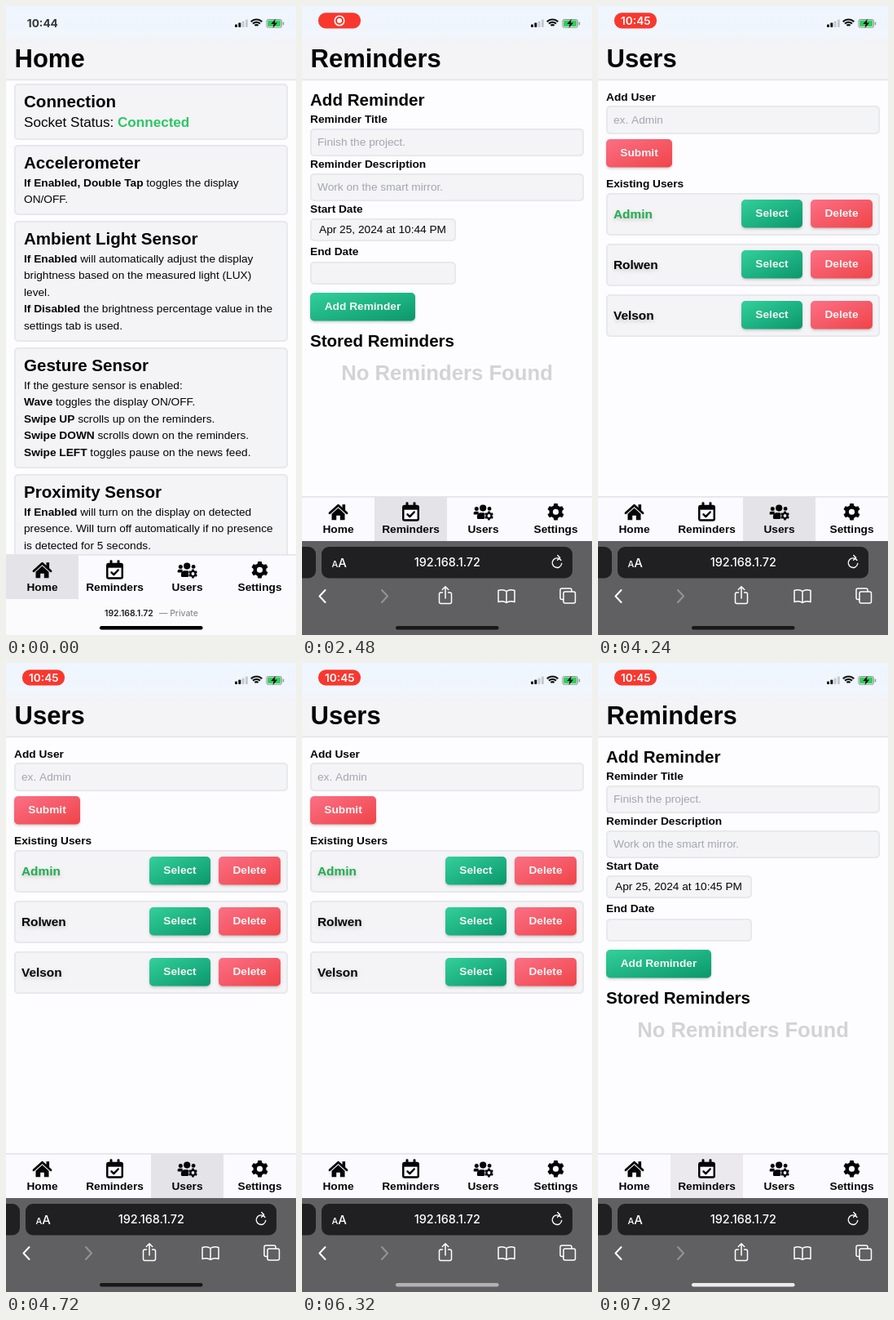
These frames come from a looping animation (356 by 770 pixels, 8 s). An HTML page with a canvas:

```html
<!DOCTYPE html>
<html lang="en">
<head>
<meta charset="utf-8">
<title>Smart mirror remote</title>
<style>
html, body { margin: 0; width: 100%; height: 100%; overflow: hidden; background: #fdfcfe; }
canvas { display: block; width: 356px; height: 770px; }
</style>
</head>
<body>
<canvas id="stage"></canvas>
<script>
const W = 356, H = 770, LOOP = 8000;
const ARIAL = '"Liberation Sans", Arial, sans-serif';
const UI = 'Inter, Roboto, sans-serif';
const SM = 13.7, MD = 15.4, LG = 17.1, XL = 20.55;
const GREEN = ['#33d09a', '#0a976b'], RED = ['#fb7086', '#f04448'];
const INK = '#050506', CARD = '#f4f3f6', LINE = '#e5e7ec';

const canvas = document.getElementById('stage');
const ctx = canvas.getContext('2d');
const dpr = window.devicePixelRatio || 1;
canvas.width = W * dpr;
canvas.height = H * dpr;

const clamp = v => Math.max(0, Math.min(1, v));
const ramp = (t, start, length) => clamp((t - start) / length);

// y is the middle of the capital letters
function text(str, x, y, size = SM, { weight = 700, color = INK, align = 'left', font = ARIAL } = {}) {
  ctx.font = `${weight} ${size}px ${font}`;
  ctx.fillStyle = color;
  ctx.textAlign = align;
  ctx.fillText(str, x, y + size * 0.358 - 0.7);
  return ctx.measureText(str).width;
}

function rich(x, y, bold, rest = '') {
  const w = bold ? text(bold, x, y) : 0;
  text(rest, x + w, y, SM, { weight: 400 });
}

function rect(x, y, w, h, fill) {
  ctx.fillStyle = fill;
  ctx.fillRect(x, y, w, h);
}

function round(x, y, w, h, r, fill) {
  ctx.beginPath();
  ctx.roundRect(x, y, w, h, r);
  ctx.fillStyle = fill;
  ctx.fill();
}

function disc(x, y, r, fill) {
  ctx.beginPath();
  ctx.arc(x, y, r, 0, Math.PI * 2);
  ctx.fillStyle = fill;
  ctx.fill();
}

function poly(points, fill) {
  ctx.beginPath();
  points.forEach(([x, y]) => ctx.lineTo(x, y));
  ctx.fillStyle = fill;
  ctx.fill();
}

function stroke(d, color, width) {
  ctx.strokeStyle = color;
  ctx.lineWidth = width;
  ctx.lineCap = ctx.lineJoin = 'round';
  ctx.stroke(new Path2D(d));
}

function at(x, y, draw) {
  ctx.save();
  ctx.translate(x, y);
  draw();
  ctx.restore();
}

function fade(alpha, draw) {
  if (alpha <= 0) return;
  ctx.save();
  ctx.globalAlpha *= alpha;
  draw();
  ctx.restore();
}

function shadowed(color, blur, dy, draw) {
  ctx.save();
  ctx.shadowColor = color;
  ctx.shadowBlur = blur * dpr;
  ctx.shadowOffsetY = dy * dpr;
  draw();
  ctx.restore();
}

function box(x, y, w, h) {
  round(x, y, w, h, 5, LINE);
  round(x + 1.7, y + 1.7, w - 3.4, h - 3.4, 4, CARD);
}

// corner to corner, with the other two corners at the middle colour
function diagonal(x, y, w, h, colors) {
  const k = w * h / (w * w + h * h), cx = x + w / 2, cy = y + h / 2;
  const g = ctx.createLinearGradient(cx - k * h, cy - k * w, cx + k * h, cy + k * w);
  colors.forEach((c, i) => g.addColorStop(i, c));
  return g;
}

function button(label, x, y, w, h, colors) {
  shadowed('rgba(0,0,0,.18)', 3, 1.7, () => round(x, y, w, h, 5, diagonal(x, y, w, h, colors)));
  text(label, x + w / 2, y + h / 2, SM, { color: '#f4f6f5', align: 'center' });
}

function field(y, w, h, value, color = INK, x = 19) {
  box(10, y, w, h);
  text(value, x, y + h / 2, SM, { weight: 400, color });
}

// ---- pages ----

const cards = [
  [170, 86, 'Accelerometer', [['If Enabled, Double Tap', ' toggles the display'], ['', 'ON/OFF.']]],
  [263, 148, 'Ambient Light Sensor', [
    ['If Enabled', ' will automatically adjust the display'],
    ['', 'brightness based on the measured light (LUX)'],
    ['', 'level.'],
    ['If Disabled', ' the brightness percentage value in the'],
    ['', 'settings tab is used.']]],
  [418, 148, 'Gesture Sensor', [
    ['', 'If the gesture sensor is enabled:'],
    ['Wave', ' toggles the display ON/OFF.'],
    ['Swipe UP', ' scrolls up on the reminders.'],
    ['Swipe DOWN', ' scrolls down on the reminders.'],
    ['Swipe LEFT', ' toggles pause on the news feed.']]],
  [573, 110, 'Proximity Sensor', [
    ['If Enabled', ' will turn on the display on detected'],
    ['', 'presence. Will turn off automatically if no presence'],
    ['', 'is detected for 5 seconds.']]]
];

function home() {
  box(10, 95, 336, 69);
  text('Connection', 22, 117, XL);
  const w = text('Socket Status: ', 22, 143, LG, { weight: 400 });
  text('Connected', 22 + w, 143, LG, { color: '#2bc765' });
  for (const [y, h, title, lines] of cards) {
    box(10, y, 336, h);
    text(title, 22, y + 22.3, XL);
    lines.forEach(([bold, rest], i) => rich(22, y + 46.3 + i * 20.6, bold, rest));
  }
}

function reminders(t) {
  const hint = '#a3a6b1';
  text('Add Reminder', 10, 115, XL);
  text('Reminder Title', 10, 139);
  field(150, 336, 34, 'Finish the project.', hint);
  text('Reminder Description', 10, 194);
  field(205, 336, 34, 'Work on the smart mirror.', hint);
  text('Start Date', 10, 249);
  field(260, 179, 28, `Apr 25, 2024 at 10:${t < 5000 ? 44 : 45} PM`, INK, 21);
  text('End Date', 10, 301);
  field(313, 179, 28, '');
  button('Add Reminder', 10, 351, 129, 34.5, GREEN);
  text('Stored Reminders', 10, 410, XL);
  text('No Reminders Found', 178, 449, 25.7, { color: '#d3d3d7', align: 'center' });
}

function users() {
  text('Add User', 10, 111.5);
  field(122, 336, 35, 'ex. Admin', '#a3a6b1');
  button('Submit', 10, 163, 81, 34.5, RED);
  text('Existing Users', 10, 218);
  ['Admin', 'Rolwen', 'Velson'].forEach((name, i) => {
    const y = 229 + i * 62;
    box(10, y, 336, 52);
    shadowed('rgba(0,0,0,.2)', 4, 2.5, () =>
      text(name, 19, y + 25.7, MD, { color: i ? INK : '#1fae50' }));
    button('Select', 176, y + 8, 75, 34.5, GREEN);
    button('Delete', 261, y + 8, 76, 34.5, RED);
  });
}

function settings() {
  text('General', 10, 115, XL);
  text('Weather Location', 10, 139);
  field(150, 336, 34, 'Edmonton');
  button('Set Location', 10, 191, 117, 34, GREEN);
  text('Time Format', 10, 245.5);
  shadowed('rgba(0,0,0,.2)', 4, 2, () => {
    text('12-Hour Format', 48, 280.5);
    text('24-Hour Format', 205, 280.5);
  });
  round(157, 270, 42, 21, 10.5, '#d2d6db');
  disc(168, 280.5, 8.5, '#fdfdfe');
  text('Display Settings', 10, 328, XL);
  text('Display Brightness', 10, 352);
  round(21, 377.5, 314, 11, 5.5, '#d4d4d6');
  shadowed('rgba(0,0,0,.4)', 2, 0.5, () => disc(327, 383, 7.5, '#fefefe'));
  text('1%', 21, 403, MD);
  text('Current Value: 100%', 169, 403, MD, { align: 'center' });
  text('100%', 335, 403, MD, { align: 'right' });
  text('Display Power State', 10, 435);
  button('ON', 10, 449, 336, 34, GREEN);
  text('Sensors', 10, 507, XL);
  round(10, 531, 336, 110, 6, diagonal(10, 531, 336, 110, RED));
  text('Accelerometer', 17, 550.5, MD, { color: '#fdeef0' });
}

const pages = [
  { title: 'Home', draw: home, icon: house },
  { title: 'Reminders', draw: reminders, icon: calendar },
  { title: 'Users', draw: users, icon: people },
  { title: 'Settings', draw: settings, icon: () => gear(0, 0, 10.5) }
];

// start time, page, delay and length of the tab highlight
const visits = [
  [0, 0, 0, 0], [1760, 1, 0, 0], [3200, 2, 80, 160],
  [4960, 3, 80, 160], [6240, 2, 100, 200], [7680, 1, 100, 200]
];

// ---- tab icons, drawn around 0,0 ----

function house() {
  stroke('M-10.5 1.5L0-8L10.5 1.5', INK, 2.8);
  rect(5, -9, 3.6, 7, INK);
  poly([[-8, 2.5], [0, -4.6], [8, 2.5], [8, 10], [2.3, 10], [2.3, 4.5],
    [-2.3, 4.5], [-2.3, 10], [-8, 10]], INK);
}

function calendar() {
  round(-10.5, -8.5, 21, 20, 3, INK);
  rect(-8, -2.5, 16, 11.5, '#faf9fd');
  round(-6, -12, 3, 6, 1.3, INK);
  round(3, -12, 3, 6, 1.3, INK);
  stroke('M-4 3.2L-1.2 6L4.2 0.3', INK, 2.5);
}

function gear(x, y, r) {
  ctx.beginPath();
  for (let i = 0; i < 6; i++) {
    [[-0.36, 0.76], [-0.21, 1], [0.21, 1], [0.36, 0.76]].forEach(([da, k]) => {
      const a = (i + 0.5) * Math.PI / 3 + da;
      ctx.lineTo(x + Math.cos(a) * r * k, y + Math.sin(a) * r * k);
    });
  }
  ctx.closePath();
  ctx.moveTo(x + r * 0.34, y);
  ctx.arc(x, y, r * 0.34, 0, Math.PI * 2);
  ctx.fillStyle = INK;
  ctx.fill('evenodd');
}

function people() {
  disc(-8.2, -3.8, 2.5, INK);
  disc(-0.3, -4.6, 4.1, INK);
  disc(7.6, -3.8, 2.4, INK);
  round(-12, -0.4, 6.2, 3.6, [2.4, 1, 0, 0.8], INK);
  round(-7.6, 1, 9.2, 7.8, [4.5, 1, 1, 1.5], INK);
  gear(7, 4.8, 5.6);
}

// ---- chrome ----

function statusBar(t) {
  const pill = ramp(t, 480, 160), clock = ramp(t, 2900, 160);
  const label = { weight: 600, font: UI, align: 'center' };
  fade(1 - pill, () => text('10:44', 44.8, 21.7, 13.6, { ...label, weight: 700, color: '#33353a' }));
  fade(pill, () => {
    round(20, 8.3, 52, 19.2, 9, '#f8382f');
    fade(1 - clock, () => {
      ctx.beginPath();
      ctx.arc(46, 18, 5.8, 0, Math.PI * 2);
      ctx.strokeStyle = '#fff';
      ctx.lineWidth = 1.5;
      ctx.stroke();
      disc(46, 18, 3, '#fff');
    });
    fade(clock, () => text('10:45', 46.3, 18.6, 13.6, { ...label, color: '#fff' }));
  });
  for (let i = 0; i < 4; i++) {
    const h = 3.5 + i * 2;
    round(281 + i * 4.3, 26 - h, 3, h, 0.8, i < 2 ? '#111214' : '#c6cad0');
  }
  for (const r of [9.5, 6.2, 2.9]) {
    ctx.beginPath();
    ctx.arc(307.5, 26, r, -Math.PI * 0.75, -Math.PI * 0.25);
    ctx.strokeStyle = '#111214';
    ctx.lineWidth = 2.2;
    ctx.lineCap = 'butt';
    ctx.stroke();
  }
  round(319.4, 16, 19.6, 10.8, 3.4, '#8d9399');
  round(320.3, 16.9, 17.8, 9, 2.6, '#eef4fb');
  round(321, 17.6, 16.4, 7.6, 2, '#35cd5b');
  round(339.8, 19.6, 1.4, 3.8, 0.7, '#8d9399');
  poly([[330.8, 15.8], [325.3, 22], [328.6, 22], [327.6, 27], [333.1, 20.6], [329.7, 20.6]], '#111214');
}

function header(title) {
  const g = ctx.createLinearGradient(0, 0, 0, 46);
  g.addColorStop(0, '#eff6ff');
  g.addColorStop(0.8, '#f1f5fc');
  g.addColorStop(1, '#f4f3f6');
  rect(0, 0, W, 90, g);
  rect(0, 89.5, W, 1.7, '#e4e4e9');
  text(title, 10.5, 65, 31);
}

function tabs(top, active, alpha) {
  rect(0, top, W, 55, '#fbfafe');
  fade(alpha, () => rect(active * 89, top, 89, 55, '#e4e3e7'));
  rect(0, top, W, 1.7, '#e4e4e9');
  pages.forEach((p, i) => {
    at(44.5 + i * 89, top + 19.2, p.icon);
    text(p.title, 44.5 + i * 89, top + 41, SM, { align: 'center' });
  });
}

function lightBar() {
  rect(0, 726, W, 44, '#fbfafd');
  text('192.168.1.72', 121, 743.5, 10.4, { weight: 600, font: UI, color: '#1c1c1e' });
  text('— Private', 188, 743.5, 10.4, { weight: 500, font: UI, color: '#8b8b90' });
  round(115, 759, 126.5, 4.4, 2.2, '#000');
}

function darkBar(t, tinted) {
  let back = '#606062', well = '#202022';
  if (tinted) {
    back = ctx.createLinearGradient(0, 655, 0, H);
    ['#44705f', '#4d6a62', '#616263', '#76545a', '#81474e', '#784a50']
      .forEach((c, i) => back.addColorStop(i / 5, c));
    well = '#04231b';
  }
  rect(0, 655, W, 115, back);
  round(-20, 662, 37, 38.5, 9, well);
  round(24, 662, 308, 38.5, 9, well);
  const white = { weight: 500, font: UI, color: '#fff' };
  text('A', 36.5, 683.5, 11, white);
  text('A', 44.3, 682.5, 15, white);
  text('192.168.1.72', 178.3, 681.8, 14.4, { ...white, align: 'center' });

  at(313, 681.5, () => {
    stroke('M4.9-3A5.8 5.8 0 1 0 5.8 1', '#fff', 1.4);
    stroke('M0.8-9L3.7-5.9L0.6-3.2', '#fff', 1.4);
  });
  stroke('M28.5 715L21.5 722.5L28.5 730', '#fff', 2);
  stroke('M98 715L105 722.5L98 730', '#949496', 2);
  at(176, 722, () => {
    stroke('M-3.5-4H-5.5Q-7.5-4-7.5-2V7.5Q-7.5 9.5-5.5 9.5H5.5Q7.5 9.5 7.5 7.5V-2Q7.5-4 5.5-4H3.5', '#fff', 1.5);
    stroke('M0 3V-11M-3.7-7.5L0-11.2L3.7-7.5', '#fff', 1.5);
  });
  at(251, 722.5, () =>
    stroke('M0-6Q-4-9-10-7V7Q-4 5 0 8Q4 5 10 7V-7Q4-9 0-6V8', '#fff', 1.5));
  at(326, 722, () => {
    stroke('M-5 4.5H-7Q-9 4.5-9 2.5V-7Q-9-9-7-9H3Q5-9 5-7V-5.5', '#fff', 1.5);
    stroke('M-3-5H7.5Q9.5-5 9.5-3V7Q9.5 9 7.5 9H-3Q-5 9-5 7V-3Q-5-5-3-5Z', '#fff', 1.5);
  });

  const v = Math.round(24 + 212 * ramp(t, 5040, 1760));
  round(115, 759, 126.5, 4.4, 2.2, `rgb(${v},${v},${v})`);
}

function render(t) {
  const [start, index, delay, length] = visits.filter(v => v[0] <= t).pop();
  const page = pages[index], top = index ? 600 : 671;
  const glow = length ? ramp(t, start + delay, length) : 1;
  ctx.setTransform(dpr, 0, 0, dpr, 0, 0);
  rect(0, 0, W, H, '#fdfcfe');
  ctx.save();
  ctx.beginPath();
  ctx.rect(0, 0, W, top);
  ctx.clip();
  page.draw(t);
  ctx.restore();
  header(page.title);
  statusBar(t);
  tabs(top, index, glow);
  if (index) darkBar(t, index === 3);
  else lightBar();
}

const began = performance.now();
function tick() {
  render((performance.now() - began) % LOOP);
  requestAnimationFrame(tick);
}
tick();
</script>
</body>
</html>
```
